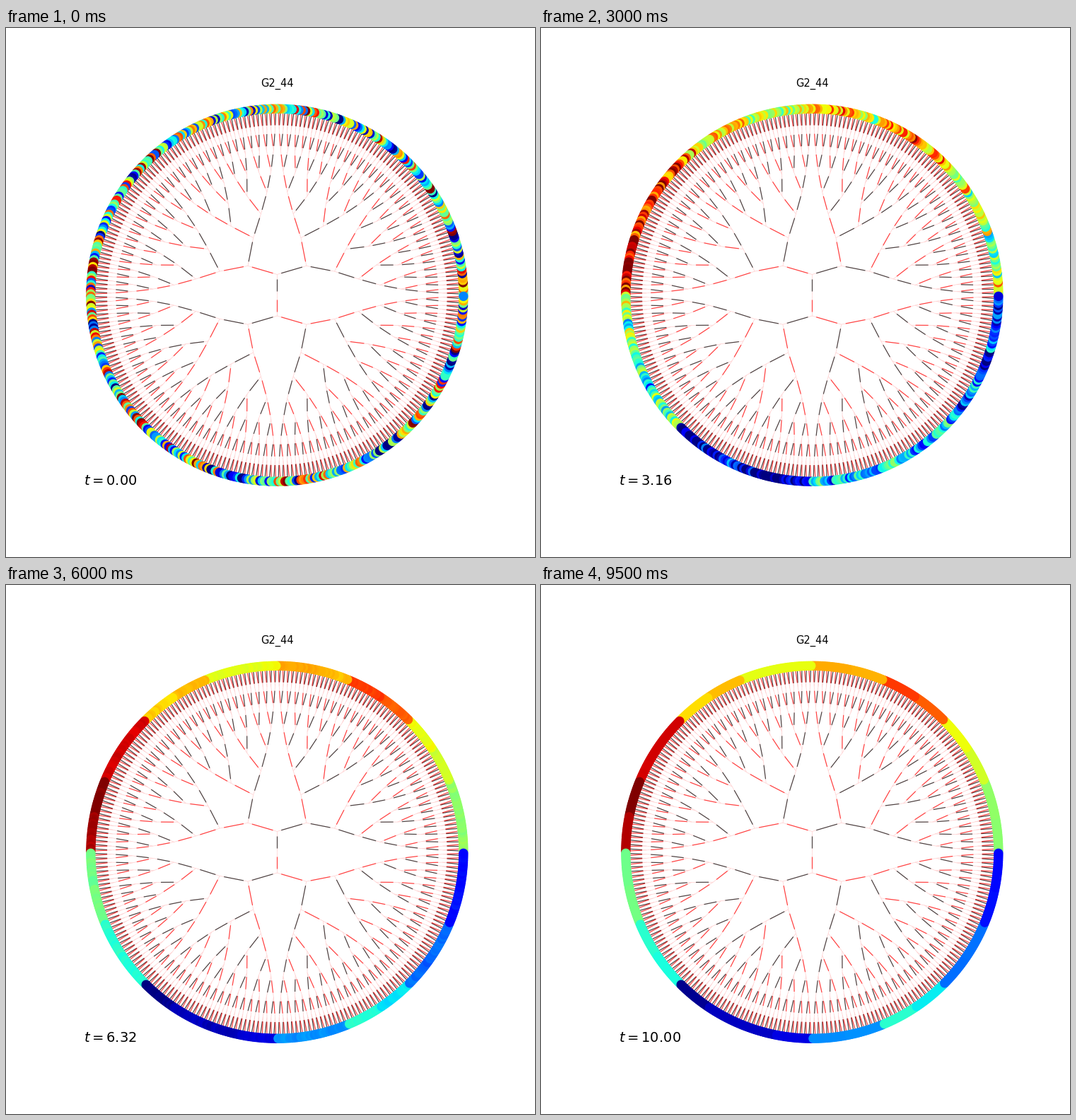
Animation of 748 by 748 pixels, one loop 10000 ms. Source, as a matplotlib script:

```python
import numpy as np
import matplotlib.pyplot as plt
from matplotlib.animation import FuncAnimation
from matplotlib.collections import LineCollection

FRAMES, END_TIME = 20, 10
LEVELS, RADIUS = 9, 263.5
LEAVES = 2 ** LEVELS
GAP = 6.1  # edges stop this far short of each node

# Value each sixteenth of the ring settles to, counterclockwise from the right.
SETTLED = [.54, .61, .83, .74, .62, .68, .90, .985,
           .465, .40, .035, .085, .28, .37, .22, .15]

rng = np.random.default_rng(44)


def block_noise(level):
    """One random value per node of a level, shared by all leaves below it."""
    return np.repeat(rng.uniform(-1, 1, 2 ** level), LEAVES // 2 ** level)


settled = np.repeat(SETTLED, LEAVES // len(SETTLED)) + .03 * block_noise(5)
ripples = {level: block_noise(level) for level in range(5, LEVELS + 1)}


def leaf_values(t):
    """Arcs drift to their settled value while finer ripples die out first."""
    values = .5 + (settled - .5) * min(1, t / 4) ** .6
    for level, noise in ripples.items():
        height = LEVELS - level
        values = values + .4 * .6 ** height * noise * np.exp(-(t / (3.2 + .3 * height)) ** 2)
    return np.clip(values, 0, 1)


def node(level, index):
    """Positions of nodes on one ring, in pixels from the centre."""
    angle = 2 * np.pi * (index + .5) / 2 ** level
    return RADIUS * level / LEVELS * np.column_stack([np.cos(angle), np.sin(angle)])


fig, ax = plt.subplots(figsize=(8.5, 8.5), dpi=88, facecolor="white")
half_width, half_height = ax.get_window_extent().size / 2
ax.set(xlim=(-half_width, half_width), ylim=(-half_height, half_height))
ax.axis("off")
ax.set_title("G2_44", fontsize=12)

links, edges, colors = [], [], []
for level in range(1, LEVELS + 1):
    children = np.arange(2 ** level)
    a, b = node(level - 1, children // 2), node(level, children)
    step = b - a
    step *= GAP / np.linalg.norm(step, axis=1, keepdims=True)
    links.extend(np.stack([a, b], axis=1))
    edges.extend(np.stack([a + step, b - step], axis=1))
    colors.extend(["black", "red"] * (len(children) // 2))

ax.add_collection(LineCollection(links, colors="#ffd0d0", linewidths=.6, zorder=1))
ax.add_collection(LineCollection(edges, colors=colors, linewidths=1, alpha=.7, zorder=2))
leaves = ax.scatter(*node(LEVELS, np.arange(LEAVES)).T, s=100, c=leaf_values(0),
                    cmap="jet", vmin=0, vmax=1, linewidths=1, zorder=3)
clock = ax.text(-273.8, -268.5, "", fontsize=16)


def update(frame):
    t = END_TIME * frame / (FRAMES - 1)
    leaves.set_array(leaf_values(t))
    clock.set_text(f"$t={t:.2f}$")
    return leaves, clock


anim = FuncAnimation(fig, update, frames=FRAMES, interval=500, repeat=True, repeat_delay=0)
plt.show()
```
